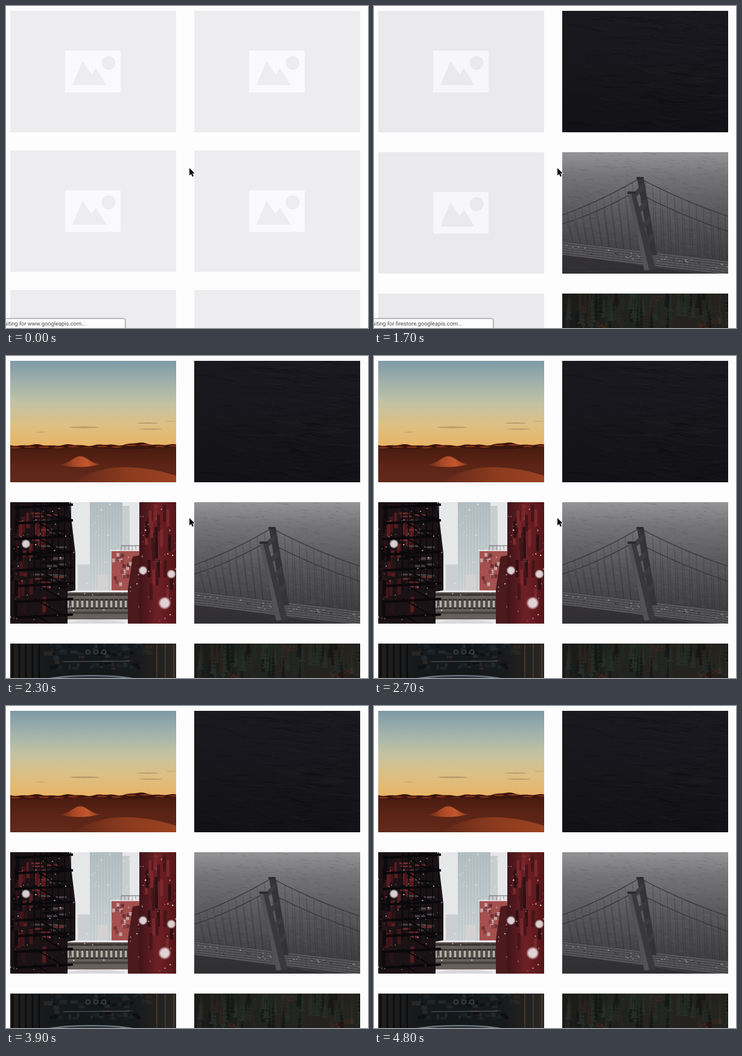
An HTML page with a canvas that plays this animation: 600x533 px, repeating every 4900 ms.

```html
<!DOCTYPE html>
<html lang="en">
<head>
<meta charset="utf-8">
<title>Lazy loading gallery</title>
<style>
  html, body { margin: 0; width: 100%; height: 100%; overflow: hidden; background: #fefdfe; }
  canvas { display: block; width: 600px; height: 533px; }
</style>
</head>
<body>
<canvas id="stage"></canvas>
<script>
const LOOP = 4900, W = 275, H = 201;
const ratio = window.devicePixelRatio || 1;
const stage = document.getElementById('stage');
stage.width = 600 * ratio;
stage.height = 533 * ratio;
const ctx = stage.getContext('2d');

function seeded(seed) {
  return () => {
    seed = (seed + 0x6D2B79F5) | 0;
    let t = Math.imul(seed ^ (seed >>> 15), 1 | seed);
    t = (t + Math.imul(t ^ (t >>> 7), 61 | t)) ^ t;
    return ((t ^ (t >>> 14)) >>> 0) / 4294967296;
  };
}

// evenly spaced colour stops
function fade(c, x0, y0, x1, y1, ...colors) {
  const g = c.createLinearGradient(x0, y0, x1, y1);
  colors.forEach((color, i) => g.addColorStop(i / (colors.length - 1), color));
  return g;
}

function box(c, color, x, y, w, h) {
  c.fillStyle = color;
  c.fillRect(x, y, w, h);
}

function poly(c, color, ...pts) {
  c.fillStyle = color;
  c.beginPath();
  for (let i = 0; i < pts.length; i += 2) c.lineTo(pts[i], pts[i + 1]);
  c.fill();
}

function line(c, color, width, x0, y0, x1, y1) {
  c.strokeStyle = color;
  c.lineWidth = width;
  c.beginPath();
  c.moveTo(x0, y0);
  c.lineTo(x1, y1);
  c.stroke();
}

function curve(c, color, width, from, to, step, f) {
  c.strokeStyle = color;
  c.lineWidth = width;
  c.beginPath();
  for (let x = from; x <= to; x += step) c.lineTo(x, f(x));
  c.stroke();
}

// fills everything below y = f(x)
function ground(c, color, from, f) {
  c.fillStyle = color;
  c.beginPath();
  c.moveTo(from, H);
  for (let x = from; x <= W; x++) c.lineTo(x, f(x));
  c.lineTo(W, H);
  c.fill();
}

function oval(c, color, x, y, rx, ry = rx) {
  c.fillStyle = color;
  c.beginPath();
  c.ellipse(x, y, rx, ry, 0, 0, 7);
  c.fill();
}

function scene(seed, paint) {
  const cv = document.createElement('canvas');
  cv.width = W * ratio;
  cv.height = H * ratio;
  const c = cv.getContext('2d');
  c.scale(ratio, ratio);
  paint(c, seeded(seed));
  return cv;
}

const desert = scene(3, c => {
  box(c, fade(c, 0, 0, 0, 140, '#7e9aa5', '#9fb1ac', '#c2c2a2', '#dcc085', '#e8b466'), 0, 0, W, 145);
  for (const [x, y, r] of [[123, 110, 25], [228, 103, 18], [233, 113, 19], [51, 118, 9], [266, 100, 9]])
    oval(c, 'rgba(165,130,95,.6)', x, y, r, r / 18);
  const ridge = x => 139.5 - 3 * Math.exp(-(((x - 215) / 30) ** 2)) + Math.sin(x / 9) + .6 * Math.sin(x / 4);
  ground(c, '#3c150d', 0, ridge);
  for (let x = 8; x < W; x += 24) oval(c, 'rgba(165,66,32,.7)', x, ridge(x) + 3, 9, 1.3);
  ground(c, fade(c, 0, 142, 0, H, '#481b10', '#5a2416', '#62291a'), 0, x => 145 + 1.5 * Math.sin(x / 25));
  const dune = x => 172 - 14 * Math.exp(-(((x - 116) / 19) ** 2));
  c.fillStyle = fade(c, 82, 0, 150, 0, '#602718', '#a64624', '#c4572c', '#8a3a20');
  c.beginPath();
  for (let x = 82; x < 150; x++) c.lineTo(x, dune(x));
  c.quadraticCurveTo(116, 180, 82, 172);
  c.fill();
  ground(c, fade(c, 105, 0, W, 0, '#62281a', '#8a3a1e', '#9c4322'), 105,
    x => 176 + ((x - 188) / (x < 188 ? 17 : 23)) ** 2);
});

const sea = scene(11, (c, r) => {
  box(c, fade(c, 0, 0, 0, H, '#1a191f', '#17161b', '#121116'), 0, 0, W, H);
  for (let i = 0; i < 230; i++) {
    const x0 = W * Math.sqrt(r()) - 20, y0 = r() * H - 4, p = r() * 6;
    curve(c, i % 2 ? 'rgba(50,48,53,.3)' : 'rgba(6,6,9,.35)', .8, x0, x0 + 15 + r() * 35, 3,
      x => y0 + (x - x0) * .1 + 1.3 * Math.sin(x / 6 + p));
  }
  for (let i = 0; i < 25; i++) box(c, 'rgba(95,93,98,.6)', 65 + r() * 200, r() * H, .8, .8);
});

const city = scene(27, (c, r) => {
  // scattered vertical and horizontal bars give walls their texture
  const bars = (n, x, y, w, h, bw, bh, ...colors) => {
    for (let i = 0; i < n; i++)
      box(c, colors[i % colors.length], x + r() * (w - bw), y + r() * (h - bh), bw, bh);
  };
  box(c, '#e6e7e9', 0, 0, W, H);
  box(c, fade(c, 0, 0, 0, 147, '#b3bec2', '#cdd4d7'), 132, 0, 54, 147);
  for (let x = 134; x < 186; x += 5) line(c, 'rgba(150,164,170,.45)', .8, x, 0, x, 147);
  box(c, '#c8cdd0', 186, 6, 12, 75);
  box(c, '#cbcfd2', 112, 103, 20, 45);
  box(c, '#d3d1d1', 144, 120, 18, 27);
  // mid block and its roof rail
  box(c, '#a4514f', 168, 80, 47, 67);
  bars(24, 168, 84, 44, 60, 5, 6, '#6b3033', '#c2a5a3', '#8a3c3c');
  poly(c, '#4a1a1d', 195, H, 195, 145, 203, 90, 215, 88, 215, H);
  line(c, '#e8dfdf', 2, 166, 80, 215, 80);
  line(c, '#6a6065', 1, 184, 72, 215, 72);
  for (let x = 184; x < 216; x += 6) line(c, '#6a6065', .7, x, 72, x, 80);
  // footbridge
  box(c, '#675f5b', 88, 149, 107, 45);
  box(c, '#ecebed', 88, 146, 107, 3);
  box(c, '#3c3634', 88, 151, 107, 4);
  for (let x = 92; x < 192; x += 8) {
    box(c, '#3a3433', x, 160, 7, 17);
    box(c, '#b5ada6', x + 1.5, 163, 4, 11);
  }
  box(c, '#484140', 88, 181, 107, 4);
  oval(c, '#d9d8da', 143, 207, 56, 13);
  // right wall
  box(c, fade(c, 214, 0, W, 0, '#3f1418', '#6f2026', '#541519'), 214, 0, 61, H);
  bars(24, 216, 0, 58, H, 5, 28, '#2e1115', '#7c272c', '#451519');
  // left wall and fire escape
  poly(c, '#1a1215', 0, 0, 98, 0, 108, 85, 108, 146, 95, 148, 95, H, 0, H);
  bars(40, 0, 0, 62, H, 6, 26, '#451519', '#0e0b0e', '#5a1c20', '#241418');
  bars(50, 34, 0, 66, 146, 18, 3, '#0a090b', '#4a4245', '#0a090b', '#6a2a2c');
  for (let y = 4; y < H; y += 26) {
    line(c, '#09080a', 4, 8, y + 5, 104, y);
    line(c, '#09080a', 2.5, 40, y, 86, y + 26);
  }
  for (let x = 40; x < 108; x += 10) line(c, '#0a090b', 1.5, x, 0, x, 146);
  for (let i = 0; i < 190; i++)
    oval(c, `rgba(245,240,242,${.3 + r() * .55})`, r() * W, r() * H, .3 + r());
  for (const [x, y, s] of [[26, 69, 8], [220, 113, 8], [267, 119, 8], [256, 167, 11]]) {
    const g = c.createRadialGradient(x, y, s * .6, x, y, s);
    g.addColorStop(0, 'rgba(238,228,231,.9)');
    g.addColorStop(1, 'rgba(238,228,231,0)');
    oval(c, g, x, y, s);
  }
});

const bridge = scene(8, (c, r) => {
  box(c, fade(c, 0, 0, 0, H, '#949395', '#747375', '#616062', '#525153', '#444345', '#3a393b'), 0, 0, W, H);
  for (let i = 0; i < 800; i++) {
    const x = r() * W, y = r() * H;
    line(c, i % 2 ? 'rgba(165,164,166,.12)' : 'rgba(25,25,27,.15)', .8, x, y, x + 3 + r() * 8, y + r() * 2);
  }
  const road = x => 148 + x * .118;
  ground(c, 'rgba(42,41,43,.6)', 0, x => 168 + x * .15);
  // each cable runs from a tower top to the picture's edge
  for (const [x0, y0, x1, y1] of [[127, 44, 0, 104], [116, 68, 0, 119], [130, 44, W, 106], [122, 66, W, 131]]) {
    const cable = x => {
      const t = (x - x0) / (x1 - x0);
      return y0 + (y1 - y0) * t + 14 * t * (1 - t);
    };
    const lean = x1 ? 3 : 10, a = Math.min(x0, x1), b = Math.max(x0, x1);
    for (let x = a + 8; x < b; x += 12)
      line(c, 'rgba(40,39,41,.5)', .7, x, cable(x), x + lean, road(x + lean));
    curve(c, '#353436', 1.2, a, b, 4, cable);
  }
  for (let d = 0; d < 22; d++)
    line(c, ['#333234', '#757476', '#454446', '#5c5b5d'][d % 4], 1.1, 0, road(0) + d, W, road(W) + d);
  for (let i = 0; i < 42; i++) {
    const x = r() * W;
    box(c, i % 3 ? '#a09fa1' : '#242325', x, road(x) + 4 + r() * 11, 2.2, 1.2);
  }
  // rear leg, braces, front leg
  poly(c, '#343335', 124, 43, 135, 43, 157, 170, 147, 172);
  for (let y = 52; y < 150; y += 27) {
    const x = 118 + (y - 48) * .21;
    poly(c, '#3c3b3d', x, y + 15, x + 14, y, x + 16, y + 9, x + 2, y + 24);
  }
  poly(c, '#39383a', 109, 68, 121, 66, 155, 194, 136, 196);
  poly(c, '#535254', 109, 68, 114, 67, 144, 195, 136, 196);
  box(c, '#2d2c2e', 108, 65, 14, 4);
  box(c, '#2d2c2e', 123, 41, 12, 4);
});

const garage = scene(19, (c, r) => {
  box(c, fade(c, 0, 0, W, 0, '#231f1d', '#15191b', '#14181a', '#171a1b', '#2b2622'), 0, 0, W, H);
  for (let i = 0; i < 70; i++)
    box(c, ['#22292d', '#2a2522', '#0e1012', '#1b2226'][i % 4], 55 + r() * 175, r() * 40, 3 + r() * 9, 2 + r() * 6);
  for (let x = 129; x < 160; x += 13) {
    oval(c, '#50575b', x, 14, 4);
    oval(c, '#181c1e', x, 14, 3);
  }
  line(c, '#5a6266', 1.2, 88, 30, 198, 29);
  for (let x = 4; x < 55; x += 11) line(c, '#0b0c0d', 3, x, 0, x, 60);
  for (let x = 243; x < W; x += 14) line(c, '#4a3f37', 1.5, x, 0, x, 60);
  oval(c, '#6f7b82', 134, 61, 78, 9);
  oval(c, '#2a3339', 134, 64, 75, 10);
});

const forest = scene(41, (c, r) => {
  box(c, fade(c, 0, 0, W, 0, '#191b19', '#222521', '#251f1c'), 0, 0, W, H);
  for (let i = 0; i < 110; i++) {
    const x = r() * W, top = r() * 50 - 25, h = 30 + r() * 25;
    const color = ['#262d27', '#161817', '#222823', '#29221f'][i % 4];
    for (let k = 1; k <= 8; k++) {
      const y = top + k * h / 8, half = k * (.5 + r() * .4);
      poly(c, color, x, y - 7, x + half, y, x - half, y);
    }
  }
  for (const [x, y] of [[158, 9], [65, 53], [257, 46], [235, 52]])
    for (let i = 0; i < 20; i++)
      oval(c, `rgba(112,44,28,${.15 + r() * .4})`, x + (r() - .5) * 18, y + (r() - .5) * 9, .7 + r());
});

const TILES = [[desert, 1800], [sea, 1000], [city, 1900], [bridge, 900], [garage, 1900], [forest, 1700]];
const FLIPS = [100, 200, 400, 500, 600, 700, 900];

function statusHost(t) {
  if (t >= 2100) return '';
  if (t >= 1100) return 'firestore.googleapis.com';
  return FLIPS.filter(at => at <= t).length % 2 ? 'codepen.io' : 'www.googleapis.com';
}

function placeholder(x, y, level) {
  const gray = v => `rgb(${v},${v - 1},${v + 1})`;
  const card = gray(level), icon = gray(level + 13);
  box(ctx, card, x, y, W, H);
  box(ctx, icon, x + 91, y + 66, 92, 69);
  poly(ctx, card, x + 103, y + 123, x + 120, y + 83, x + 135, y + 106, x + 142, y + 95, x + 160, y + 123);
  oval(ctx, card, x + 163, y + 86, 11.5);
}

function statusBar(host) {
  ctx.save();
  ctx.beginPath();
  ctx.roundRect(-9.5, 517.5, 207, 30, 3);
  ctx.shadowColor = 'rgba(0,0,0,.3)';
  ctx.shadowBlur = 3 * ratio;
  ctx.fillStyle = '#fdfcfd';
  ctx.fill();
  ctx.shadowColor = 'transparent';
  ctx.lineWidth = 1;
  ctx.strokeStyle = '#98979a';
  ctx.stroke();
  ctx.fillStyle = '#4c4b4e';
  ctx.font = '9.3px Roboto, sans-serif';
  ctx.fillText(`Waiting for ${host}...`, -11.5, 528.5);
  ctx.restore();
}

const arrow = new Path2D('M304 268v12.5l2.8-2.5 2 4.4 2.2-1-2-4.2 3.6-.2z');

function cursor() {
  ctx.lineJoin = 'round';
  ctx.lineWidth = 1.6;
  ctx.strokeStyle = '#fff';
  ctx.stroke(arrow);
  ctx.fillStyle = '#0a0a0b';
  ctx.fill(arrow);
}

function draw(t) {
  ctx.setTransform(ratio, 0, 0, ratio, 0, 0);
  box(ctx, '#fefdfe', 0, 0, 600, 533);
  const level = Math.round(233.5 + 3.5 * Math.cos(t / 2200 * 2 * Math.PI));
  let y = 8;
  // a loaded picture makes its row 3 px taller
  for (let row = 0; row < 3; row++) {
    const pair = TILES.slice(row * 2, row * 2 + 2);
    pair.forEach(([pic, at], i) => {
      const x = 7 + 305 * i;
      if (t >= at) ctx.drawImage(pic, x, y, W, H);
      else placeholder(x, y, level);
    });
    y += 231 + (pair.some(([, at]) => t >= at) ? 3 : 0);
  }
  const host = statusHost(t);
  if (host) statusBar(host);
  if (t < 3500) cursor();
}

const start = performance.now();
function tick(now) {
  draw(Math.max(0, now - start) % LOOP);
  requestAnimationFrame(tick);
}
draw(0);
requestAnimationFrame(tick);
</script>
</body>
</html>
```
